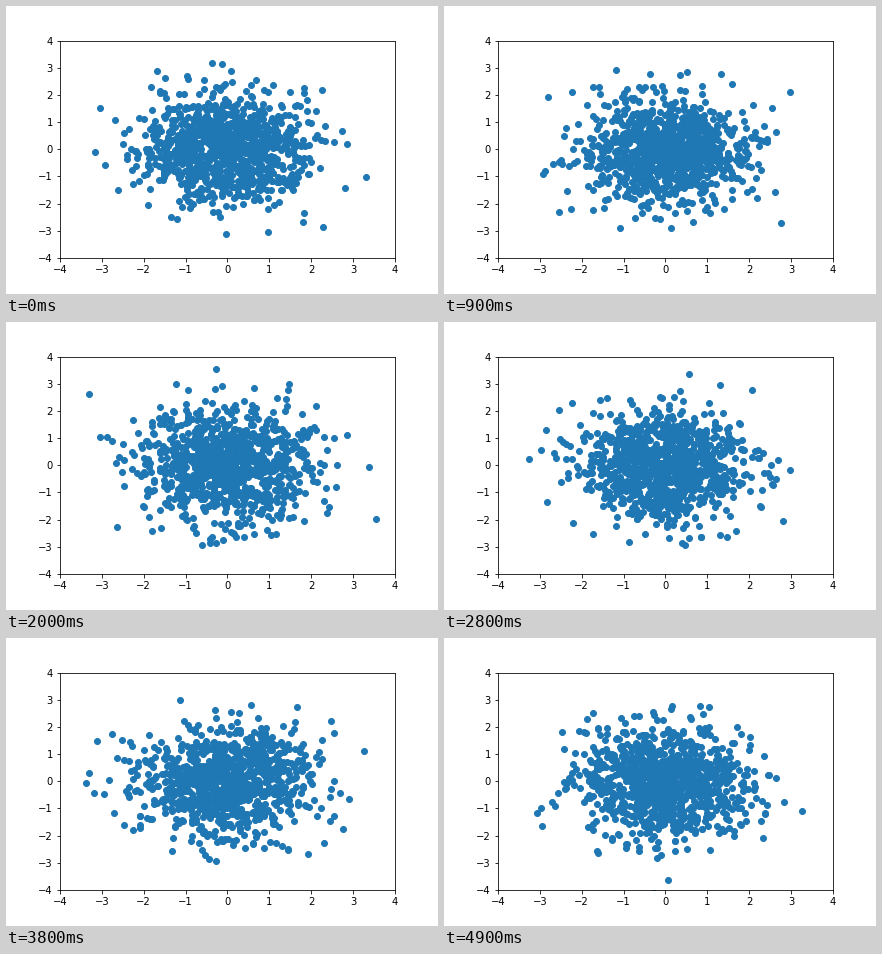
Animation, 432 px wide and 288 px high, one loop 5 s. Source, as a matplotlib script:

```python
import matplotlib.pyplot as plt
import numpy as np
from matplotlib.animation import FuncAnimation

FRAMES = 50
INTERVAL = 100
POINTS = 1000
LIMIT = 4

plt.rcParams.update({"font.family": "DejaVu Sans", "font.size": 10})

fig = plt.figure(figsize=(6, 4), dpi=72, facecolor="white")
fig.subplots_adjust(left=0.125, right=0.9, bottom=0.125, top=0.88)
ax = fig.add_subplot()
ax.set(xlim=(-LIMIT, LIMIT), ylim=(-LIMIT, LIMIT))
ticks = range(-LIMIT, LIMIT + 1)
ax.set_xticks(ticks)
ax.set_yticks(ticks)


def cloud(frame):
    """A fresh standard normal sample for every frame."""
    return np.random.default_rng(500 + frame).standard_normal((2, POINTS))


dots, = ax.plot(*cloud(0), "o", color="#1f77b4",
                markersize=6, markeredgewidth=1)


def update(frame):
    dots.set_data(*cloud(frame))
    return (dots,)


anim = FuncAnimation(fig, update, frames=FRAMES, interval=INTERVAL,
                     repeat=True, repeat_delay=0, blit=False)
plt.show()
```
